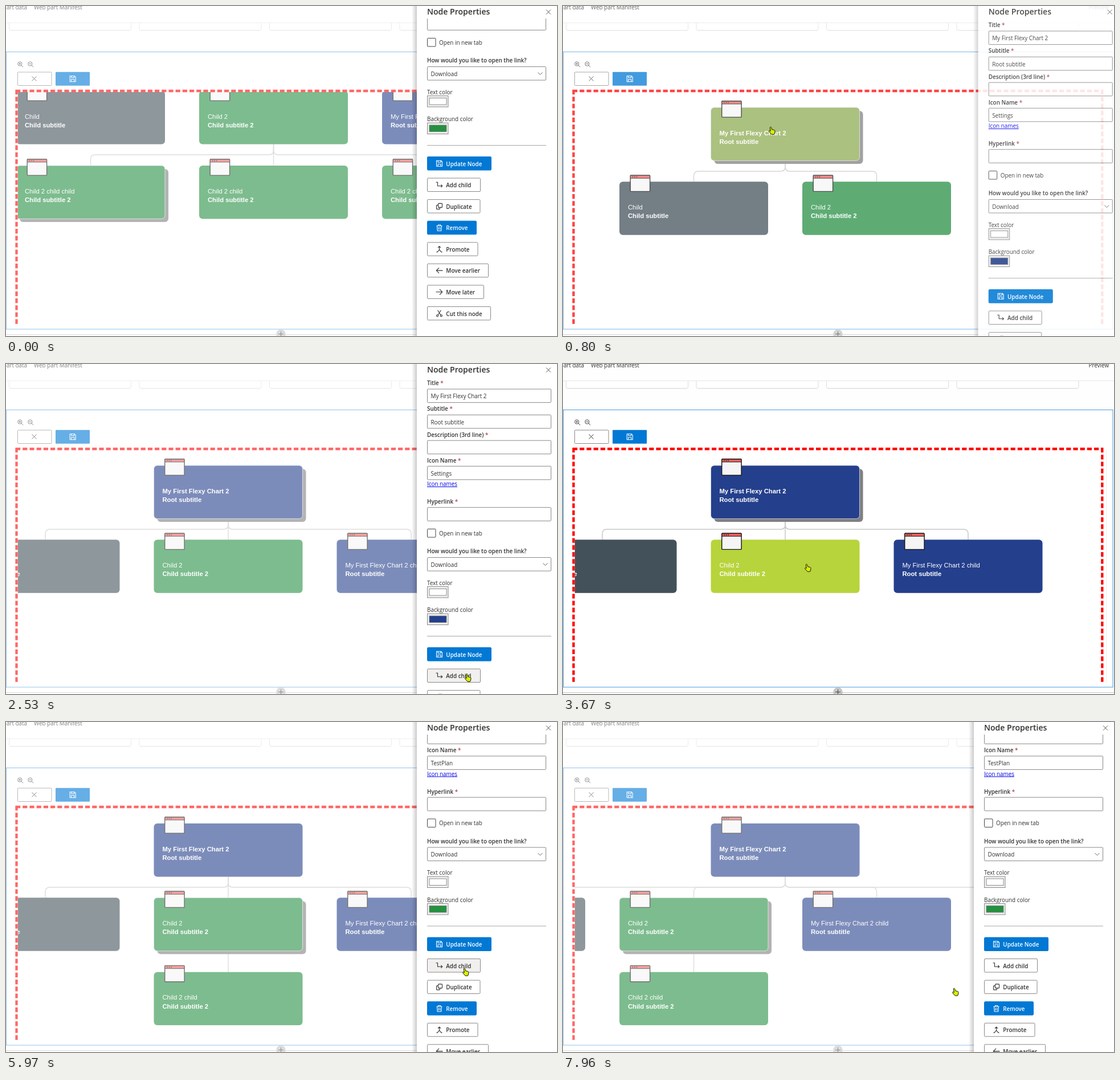
Animation, 967 px wide and 579 px high, one loop 8 s. Source, as an HTML page:

```html
<!DOCTYPE html>
<html lang="en">
<head>
<meta charset="utf-8">
<title>Chart editor</title>
<style>
html, body { margin: 0; width: 100%; height: 100%; overflow: hidden; background: #fff; }
svg { display: block; width: 100%; height: 100%; }
text { font: 9.9px "Open Sans", "Noto Sans", sans-serif; fill: #323130; white-space: pre; }
.b { font-weight: 600; }
.h { font-size: 14.05px; font-weight: 600; }
.n { font: 11.25px "Liberation Sans", Arial, sans-serif; fill: #fff; }
.nb { font-weight: bold; }
</style>
</head>
<body>
<svg id="stage" viewBox="0 0 967 579"></svg>
<script>
const stage = document.getElementById('stage');
const LOOP = 8000, PITCH = 321;
const GRAY = [67, 81, 90], GREEN = [38, 143, 67], BLUE = [36, 63, 140], HOVER = [183, 212, 60];

const clamp = v => Math.max(0, Math.min(1, v));
const ramp = (t, a, b) => clamp((t - a) / (b - a));
const easeOut = u => 1 - (1 - u) ** 3;
const easeIO = u => u * u * (3 - 2 * u);
const rgb = c => `rgb(${c.map(Math.round)})`;
const mix = (a, b, k) => a.map((v, i) => v + (b[i] - v) * k);

// cubic-bezier(.1, .9, .2, 1)
function snap(u) {
  if (u <= 0 || u >= 1) return clamp(u);
  let lo = 0, hi = 1;
  for (let i = 0; i < 18; i++) {
    const s = (lo + hi) / 2, r = 1 - s;
    if (.3 * r * r * s + .6 * r * s * s + s ** 3 < u) lo = s; else hi = s;
  }
  const r = 1 - lo;
  return 2.7 * r * r * lo + 3 * r * lo * lo + lo ** 3;
}

const rect = (x, y, w, h, fill, more = '') =>
  `<rect x="${x}" y="${y}" width="${w}" height="${h}" fill="${fill}" ${more}/>`;
const path = (d, stroke, w = 1, more = '') =>
  `<path d="${d}" fill="none" stroke="${stroke}" stroke-width="${w}" ${more}/>`;
const text = (x, y, s, cls = '', more = '') => `<text x="${x}" y="${y}" class="${cls}" ${more}>${s}</text>`;
const group = (x, y, s, more = '') => `<g transform="translate(${x} ${y})" ${more}>${s}</g>`;

const ICONS = {
  save: 'M1 1h8l2 2v8H1zM3.5 1v3h5V1M3.5 11V7h5v4',
  add: 'M0 1.5h3v6.5h8M8.8 5.6 11.2 8 8.8 10.4',
  copy: 'M5 1h5q1 0 1 1v5q0 1-1 1H5Q4 8 4 7V2q0-1 1-1M4 4H2Q1 4 1 5v5q0 1 1 1h4q1 0 1-1V8',
  trash: 'M1 2.8h10M4 2.8V1h4v1.8M2 2.8l.7 8.7h6.6L10 2.8M4.7 5v4.5M7.3 5v4.5',
  promote: 'M6 1v6L2.5 11H1M6 7l3.5 4H11M3.5 3.5 6 1l2.5 2.5',
  left: 'M12 6H.8M5.5 1.2.8 6l4.7 4.8',
  right: 'M0 6h11.2M6.5 1.2 11.2 6 6.5 10.8',
  cut: 'M3 .5 8.2 8.4M9 .5 3.8 8.4M4.2 10a1.6 1.6 0 1 1-3.2 0a1.6 1.6 0 1 1 3.2 0M11 10a1.6 1.6 0 1 1-3.2 0a1.6 1.6 0 1 1 3.2 0'
};
// label, icon, y, width, primary
const BUTTONS = [
  ['Update Node', 'save', 497.5, 113, 1],
  ['Add child', 'add', 535, 94, 0],
  ['Duplicate', 'copy', 572.6, 93.5, 0],
  ['Remove', 'trash', 610.2, 87, 1],
  ['Promote', 'promote', 647.8, 89.5, 0],
  ['Move earlier', 'left', 685.3, 108, 0],
  ['Move later', 'right', 722.9, 100, 0],
  ['Cut this node', 'cut', 760.5, 112, 0]
];

// Pointer path: time, x, y of the tip
const MOVES = [
  [250, 560, 345], [670, 364, 212], [1400, 364, 212], [2130, 808, 544], [2890, 808, 544],
  [3390, 427, 351], [4080, 427, 351], [4450, 917, 415], [4730, 917, 415], [4890, 822, 462],
  [5040, 804, 432], [6670, 804, 432], [7280, 804, 462], [7480, 804, 462], [7950, 686, 467]
];
function pointerAt(t) {
  const i = MOVES.findIndex(m => m[0] > t);
  if (i < 0) return MOVES[MOVES.length - 1].slice(1);
  const [t0, x0, y0] = MOVES[i - 1], [t1, x1, y1] = MOVES[i];
  const k = easeIO(ramp(t, t0, t1));
  return [x0 + (x1 - x0) * k, y0 + (y1 - y0) * k];
}
function pointer(t, [x, y]) {
  const arrow = t > 4180 && t < 4830;
  const d = arrow ? 'M0 0V10.5L2.5 8.2 4.3 12 6 11.2 4.3 7.6H7.5Z'
    : 'M-.8 1Q.4-.9 1.6 1l1 3.6 4 1q1.6.5 1.4 2l-.5 3.4-1 2.2H2.2L-1.8 9Q-3.2 6.8-1.6 6.4l2 1z';
  return group(x, y, `<path d="${d}" fill="#d8f000" stroke="#111" stroke-width="1" stroke-linejoin="round"/>`);
}

function windowIcon(x, y) {
  const dots = [3, 6.5, 10].map(d => `<circle cx="${d + 2}" cy="3.3" r=".9" fill="#111"/>`).join('');
  return group(x, y, rect(.7, .7, 34.4, 28.4, '#f5f5f5', 'rx="1"') + rect(.7, .7, 34.4, 5.2, '#f0625f') +
    dots + path('M.7 5.9h34.4', '#111', 1) + rect(.7, .7, 34.4, 28.4, 'none', 'rx="1" stroke="#111" stroke-width="1.4"'));
}

function node(cx, y, title, sub, color, { on = false, bold = '', alpha = 1 } = {}) {
  const shadow = on ? rect(6, 6, 261, 93, '#808080', 'rx="6"') : '';
  return group(cx - 130.5, y, shadow +
    rect(0, 0, 261, 93.4, rgb(color), `rx="6" ${on ? 'stroke="#dde" stroke-width=".8"' : ''}`) +
    windowIcon(18.5, -12) + text(15, 48.5, title, 'n ' + bold) + text(15, 64, sub, 'n nb'), `opacity="${alpha}"`);
}

function link(px, py, cx) {
  const r = Math.sign(cx - px) * 8;
  const d = Math.abs(cx - px) < 1 ? `M${px} ${py}v37.5`
    : `M${px} ${py}v11q0 8 ${r} 8H${cx - r}q${r} 0 ${r} 8v10.5`;
  return path(d, '#c8c8c8', 1.5);
}

function firstChart() {
  const xs = [148.5, 469.5, 790.5];
  const top = [['Child', 'Child subtitle', GRAY], ['Child 2', 'Child subtitle 2', GREEN],
    ['My First Flexy Chart 2 child', 'Root subtitle', BLUE]];
  const low = ['Child 2 child child', 'Child 2 child', 'Child 2 child'];
  return xs.map(x => link(469.5, 242, x)).join('') +
    xs.map((x, i) => node(x, 149, ...top[i]) +
      node(x, 280, low[i], 'Child subtitle 2', GREEN, { on: i === 0 })).join('');
}

function mainChart(t) {
  const added = easeOut(ramp(t, 2190, 2520)), cloned = easeOut(ramp(t, 7430, 7800));
  const grown = easeOut(ramp(t, 5470, 5800));
  const xs = [0, 1, 2, 3].map(i => 229.5 + PITCH * i - PITCH / 2 * (added + cloned));
  const count = 2 + (added > 0) + (cloned > 0);
  const rootHover = ramp(t, 500, 680) * (1 - ramp(t, 740, 960));
  const childHover = ramp(t, 3490, 3660) * (1 - ramp(t, 3800, 4020));
  const green = mix(GREEN, HOVER, childHover), picked = t >= 3760;
  let s = xs.slice(0, count).map(x => link(390, 271, x)).join('');
  if (grown) s += link(xs[1], 401, xs[1]);
  s += node(390, 178, 'My First Flexy Chart 2', 'Root subtitle', mix(BLUE, HOVER, rootHover),
    { on: t >= 700 && !picked, bold: 'nb' });
  s += node(xs[0], 308.3, 'Child', 'Child subtitle', GRAY);
  s += node(xs[1], 308.3, 'Child 2', 'Child subtitle 2', green, { on: picked });
  if (added) s += node(xs[2], 308.3, 'My First Flexy Chart 2 child', 'Root subtitle', BLUE, { alpha: added });
  if (cloned) s += node(xs[3], 308.3, 'Child 2', 'Child subtitle 2', GREEN, { alpha: cloned });
  if (grown) s += node(xs[1], 308.3 + 130.4 * grown, 'Child 2 child', 'Child subtitle 2', GREEN, { alpha: grown });
  return s;
}

function page(chart) {
  let s = rect(0, 0, 967, 579, '#fefefe');
  for (let i = 0; i < 4; i++)
    s += rect(5.5 + i * 228.5, 20, 214, 22.5, '#fff', 'rx="2.5" stroke="#dcdcdc"') +
      path(`M${7 + i * 228.5} 43.4h211`, '#eee');
  s += rect(0, 0, 967, 29, '#fefefe') + path('M0 29.5h967', '#e6e6e6');
  s += text(37, 6, 'Web part data', '', 'text-anchor="end"') + text(49, 6, 'Web part Manifest') + text(922.5, 6, 'Preview');
  s += rect(.5, 80.5, 964.5, 486.5, '#fff', 'stroke="#4a9ce0"');
  s += [25, 43].map((x, i) => group(x, 102, `<circle cx="-.7" cy="-.5" r="3.6" fill="none" stroke="#444"/>` +
    path('M2 2.2 5.2 5.3M-2.6-.5h3.8' + (i ? '' : 'M-.7-2.4v3.8'), '#444'))).join('');
  s += rect(20.5, 116, 59.5, 23.5, '#fff', 'rx="1" stroke="#8a8886"') + path('M45.5 123.5l8 8m0-8l-8 8', '#333');
  s += rect(87, 115.7, 60, 24, '#0078d4', 'rx="1"') + group(111.2, 121.7, path(ICONS.save, '#fff', 1.1));
  s += path('M953.5 150V561', '#eee');
  s += `<g clip-path="url(#view)">${chart}</g>`;
  s += path('M17 149H948', '#f00', 4.3, 'stroke-dasharray="8.2 4"') +
    path('M18.5 147V561M946.3 147V561', '#f00', 4.3, 'stroke-dasharray="8.2 4"');
  s += path('M0 576.5h967', '#c4c4c4') + '<circle cx="482.5" cy="575.5" r="8.3" fill="#c6c6c6"/>' +
    path('M478 575.5h9M482.5 571v9', '#444');
  return s;
}

function panel(t, scroll, form, tip) {
  const w = scroll ? 209 : 218;
  const field = (y, v = '') => rect(.5, y, w - 1, 23.6, '#fff', 'rx="1" stroke="#8a8886"') + text(6.5, y + 16.4, v);
  const label = (y, s) => text(0, y, `${s} <tspan fill="#a4262c" font-weight="400">*</tspan>`, 'b');
  const swatch = (y, c) => rect(.5, y, 36.5, 19.5, '#efefef', 'stroke="#8a8a8a"') +
    rect(4, y + 4, 30, 11.5, c, 'stroke="#777" stroke-width=".8"');
  let s = label(37.3, 'Title') + field(44, form[0]) + label(82.3, 'Subtitle') + field(89.3, form[1]) +
    label(127.7, 'Description (3rd line)') + field(134.2) + label(172.6, 'Icon Name') + field(179.3, form[2]) +
    text(0, 214, 'Icon names', '', 'style="fill:#00e" text-decoration="underline"') +
    label(245, 'Hyperlink') + field(251.7) +
    rect(.5, 289.5, 14.5, 14.5, '#fff', 'rx="1" stroke="#444"') + text(21, 300.7, 'Open in new tab') +
    text(0, 332.3, 'How would you like to open the link?', 'b') + field(339.5, 'Download') +
    path(`M${w - 14.5} 349.5l4 4 4-4`, '#666') +
    text(0, 387.7, 'Text color') + swatch(390.5, '#fff') +
    text(0, 435, 'Background color') + swatch(438, form[3]) + path(`M0 477.5h${w}`, '#a6a6a6');
  for (const [name, icon, y, bw, primary] of BUTTONS) {
    const over = tip && tip[0] > 739 && tip[0] < 739 + bw && tip[1] > y - scroll && tip[1] < y + 24 - scroll;
    const press = over && t > 5350 && t < 5500;
    const fill = primary ? '#0078d4' : press ? '#e6e4e2' : over ? '#f1f0ef' : '#fff';
    const ink = primary ? '#fff' : '#323130';
    s += rect(.5, y, bw - 1, 23.5, fill, `rx="1.5" stroke="${primary ? fill : '#8a8886'}"`) +
      group(15.5, y + 5.8, path(ICONS[icon], ink, 1.1)) +
      text(33.3, y + 16, name, 'b', `style="fill:${ink}"`);
  }
  return rect(712, 0, 9, 579, 'url(#edge)') + rect(721, 0, 290, 579, '#fff') +
    `<g clip-path="url(#body)">${group(739, -scroll, s)}</g>` +
    text(739, 14.8, 'Node Properties', 'h') + path('M948 6.5l8 8m0-8l-8 8', '#555');
}

const DEFS = `<defs>
<clipPath id="view"><rect x="20.7" y="151" width="923.5" height="410"/></clipPath>
<clipPath id="body"><rect x="721" y="22" width="290" height="557"/></clipPath>
<linearGradient id="edge"><stop offset="0" stop-opacity="0"/><stop offset="1" stop-opacity=".2"/></linearGradient>
</defs>`;
const ROOT_FORM = ['My First Flexy Chart 2', 'Root subtitle', 'Settings', rgb(BLUE)];
const CHILD_FORM = ['Child 2', 'Child subtitle 2', 'TestPlan', rgb([36, 145, 65])];

function draw(t) {
  const intro = t < 250, second = t >= 3700;
  const tip = intro ? null : pointerAt(t);
  const enter = intro ? 1 : snap(ramp(t, second ? 3800 : 740, second ? 4167 : 1107));
  const leave = second ? 0 : ramp(t, 3340, 3510);
  const shown = 1 - leave;
  const scroll = intro ? 233 : 119.5 * easeIO(ramp(t, 4210, 4500));
  let s = DEFS + page(intro ? firstChart() : mainChart(t));
  if (enter > 0 && shown > 0) {
    s += rect(0, 0, 967, 579, '#fff', `opacity="${.4 * enter ** 1.45 * shown}"`);
    s += group(30 * (1 - enter + leave), 0, panel(t, scroll, intro || second ? CHILD_FORM : ROOT_FORM, tip),
      `opacity="${Math.sqrt(enter) * shown}"`);
  }
  if (tip) s += pointer(t, tip);
  stage.innerHTML = s;
}

function frame() {
  draw(performance.now() % LOOP);
  requestAnimationFrame(frame);
}
frame();
</script>
</body>
</html>
```
